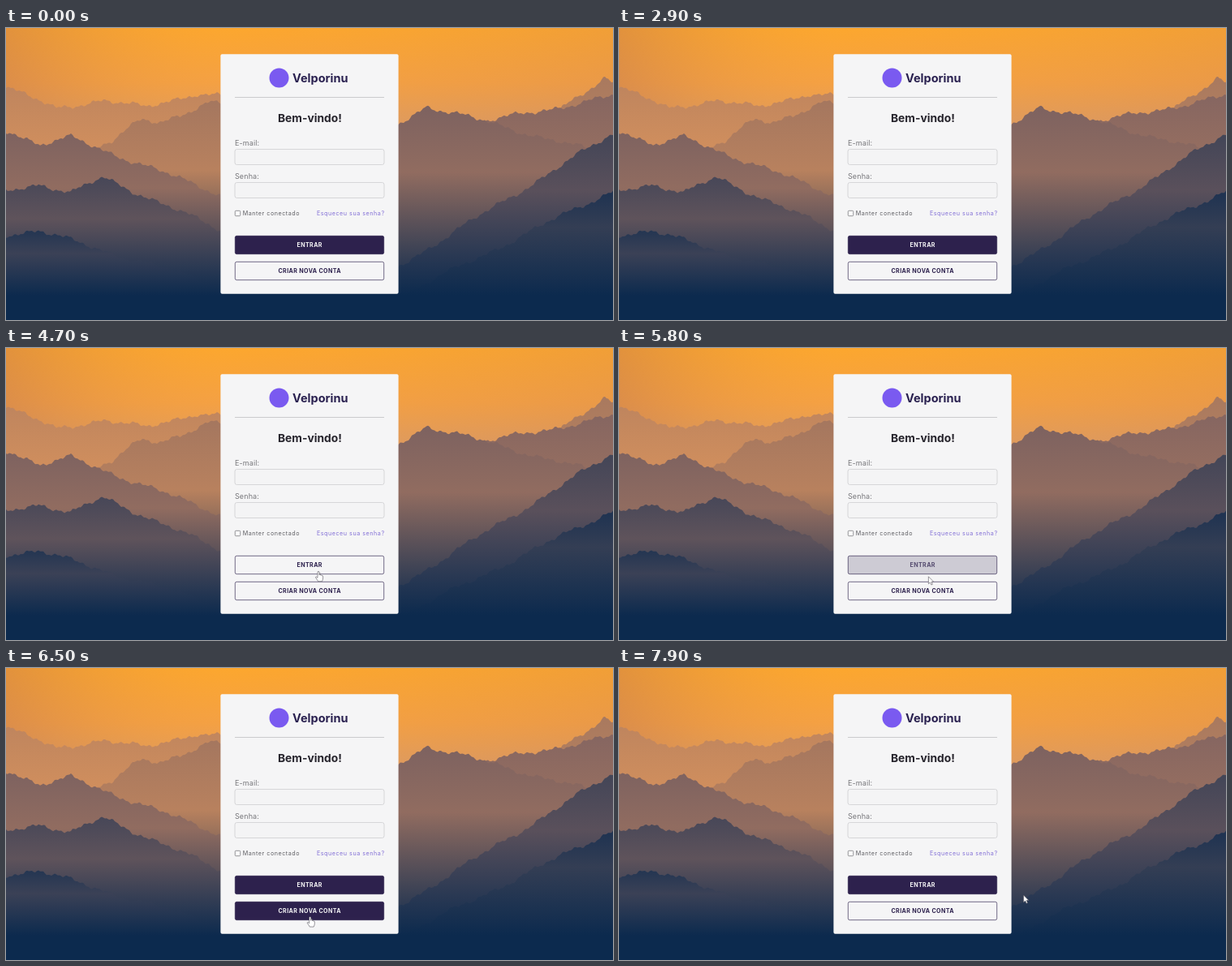
Write an HTML page that moves like this. It is 748 px wide and 360 px high and loops after 8000 ms.

```html
<!DOCTYPE html>
<html lang="pt-BR">
<head>
<meta charset="utf-8">
<title>Login</title>
<style>
  html, body { margin: 0; width: 100%; height: 100%; overflow: hidden; background: #0a294e; }
  svg { display: block; width: 748px; height: 360px; font-family: Inter, "Open Sans", sans-serif; }
  .field { fill: #f4f4f5; stroke: #cfcfd1; stroke-width: .8; }
  .label { font-size: 9px; letter-spacing: .1px; fill: #77777b; }
  .small { font-size: 7.2px; letter-spacing: .52px; fill: #606065; }
  .button text { font-size: 7.1px; letter-spacing: .38px; font-weight: 700; text-anchor: middle; }
  .button rect { stroke: #2d214d; stroke-width: .65; }
  .pointer path { fill: #fff; stroke: #55515c; stroke-width: .6; stroke-linejoin: round; }
</style>
</head>
<body>
<svg viewBox="0 0 748 360">
  <defs>
    <linearGradient id="sky" x2="0" y2="1">
      <stop offset="0" stop-color="#fca62e"/>
      <stop offset=".45" stop-color="#f39f45"/>
      <stop offset=".8" stop-color="#dc9a64"/>
    </linearGradient>
    <linearGradient id="dusk">
      <stop offset="0" stop-color="#bd7650" stop-opacity=".42"/>
      <stop offset=".36" stop-color="#ffae34" stop-opacity=".1"/>
      <stop offset="1" stop-color="#cf8850" stop-opacity=".25"/>
    </linearGradient>
  </defs>
  <rect width="748" height="150" fill="url(#sky)"/>
  <rect width="748" height="150" fill="url(#dusk)"/>
  <g id="hills"></g>

  <rect x="264.4" y="32.2" width="219.2" height="295.6" rx="2" fill="#f5f5f6"/>
  <circle cx="336.5" cy="61.5" r="12" fill="#7a5af0"/>
  <text x="353" y="67" font-size="14.5" font-weight="700" fill="#2a2150">Velporinu</text>
  <path d="M282 85.5H466" stroke="#cbcbcd"/>
  <text x="374.4" y="115.7" font-size="13.8" font-weight="700" text-anchor="middle" fill="#27252d">Bem-vindo!</text>

  <text class="label" x="282" y="145">E-mail:</text>
  <rect class="field" x="282" y="149.5" width="184" height="19" rx="2.5"/>
  <text class="label" x="282" y="186">Senha:</text>
  <rect class="field" x="282" y="190.5" width="184" height="19" rx="2.5"/>

  <rect x="282.3" y="225.3" width="6.4" height="6.4" rx="1" fill="#fff" stroke="#77777b" stroke-width=".8"/>
  <text class="small" x="291.7" y="231.2">Manter conectado</text>
  <text class="small" x="466.6" y="231.2" text-anchor="end" style="fill:#8370d6">Esqueceu sua senha?</text>

  <g class="button" id="enter">
    <rect x="282.3" y="256.3" width="183.4" height="22.4" rx="2"/>
    <text x="374.2" y="270">ENTRAR</text>
  </g>
  <g class="button" id="create">
    <rect x="282.3" y="288.3" width="183.4" height="22.4" rx="2"/>
    <text x="374.2" y="302">CRIAR NOVA CONTA</text>
  </g>

  <g class="pointer" id="pointer">
    <path id="arrow" d="M0 0V9L2.1 7.1 3.5 10.2 5 9.5 3.7 6.5H6.4Z"/>
    <path id="hand" d="M-1 .6Q0-.6 1 .6V4.6Q2-.1 2.6 4.8 3.8 4.2 4.2 5.4 5.6 5 5.6 6.4V8.6Q5.5 10.4 4.5 12.4H-.4Q-1.4 10.4-3.2 8.2-4 6.9-2.8 6.7L-1 8Z"/>
  </g>
</svg>
<script>
const $ = id => document.getElementById(id);
const LIGHT = [245, 245, 246], DARK = [45, 33, 77];
const HAZE = [226, 152, 92], BROWN = [130, 100, 97], NAVY = [12, 42, 78];
const LEFT = 0, RIGHT = 374;

const progress = (t, from, to) => Math.max(0, Math.min(1, (t - from) / (to - from)));
const ease = p => p * p * (3 - 2 * p);
const mix = (a, b, p) => a + (b - a) * p;
const blend = (a, b, p) => `rgb(${a.map((v, i) => Math.round(mix(v, b[i], p)))})`;

// Colour of the air at a depth: 0 is far and hazy, 1 is near and dark.
const air = depth => depth < .5 ? blend(HAZE, BROWN, depth * 2) : blend(BROWN, NAVY, depth * 2 - 1);

// Slopes fall away from each peak; every ridge fades into mist below its crest.
function ridge(side, depth, ...peaks) {
  const id = 'ridge' + $('hills').childElementCount;
  const rough = x => [.05, .13, .37, .9].reduce((sum, f, i) => sum + Math.sin(x * f + depth * 50) * (2 - i * .4), 0);
  const height = x => Math.min(...peaks.map(([px, py, fallLeft, fallRight]) =>
    py + (x < px ? (px - x) * fallLeft : (x - px) * fallRight)));
  let edge = '';
  for (let x = side; x <= side + 374; x += 2) edge += `L${x} ${(height(x) + rough(x)).toFixed(1)}`;
  const crest = Math.min(...peaks.map(p => p[1]));
  $('hills').insertAdjacentHTML('beforeend', `
    <linearGradient id="${id}" gradientUnits="userSpaceOnUse" x1="0" x2="0" y1="${crest}" y2="330">
      <stop stop-color="${air(depth)}"/>
      <stop offset=".35" stop-color="${air(depth - .1)}"/>
      <stop offset="1" stop-color="${air(1)}"/>
    </linearGradient>
    <path fill="url(#${id})" d="M${side} 360${edge}V360Z"/>`);
}

ridge(LEFT, .18, [0, 72, 0, .45], [120, 88, .2, .2], [235, 80, .3, .1]);
ridge(LEFT, .32, [167, 113, .75, .15], [250, 92, .4, .1]);
ridge(LEFT, .52, [5, 126, 0, .5], [80, 135, .25, .38]);
ridge(LEFT, .75, [40, 192, .2, .3], [120, 184, .5, .45]);
ridge(LEFT, .9, [40, 250, .1, .3]);
ridge(RIGHT, .3, [738, 60, .75, .6]);
ridge(RIGHT, .48, [748, 84, .2, 0]);
ridge(RIGHT, .52, [518, 96, .65, .27]);
ridge(RIGHT, .77, [748, 130, .62, 0]);
ridge(RIGHT, .93, [748, 200, .5, 0]);

// Pointer stops: time, x, y. The way out swings downwards.
const stops = [
  [3400, 488, 246], [4200, 408.5, 256.7], [4700, 385, 275.3], [5600, 385, 275.3],
  [6100, 374.7, 293.8], [6500, 374.7, 306.7], [7100, 374.7, 306.7], [7900, 498.5, 280]
];
const SWING = 33;

function tip(t) {
  const next = Math.max(1, stops.findIndex(s => t <= s[0]));
  const [t1, x1, y1] = stops[next - 1], [t2, x2, y2] = stops[next];
  const p = ease(progress(t, t1, t2));
  const swing = next === stops.length - 1 ? SWING * 4 * p * (1 - p) : 0;
  return [mix(x1, x2, p), mix(y1, y2, p) + swing];
}

function paintButton(id, filled) {
  const [box, label] = $(id).children;
  box.style.fill = blend(LIGHT, DARK, filled);
  label.style.fill = blend(DARK, LIGHT, filled);
}

function draw() {
  const t = Math.floor(performance.now() % 8000 / 100) * 100;
  const [x, y] = tip(t);
  const over = x > 282 && x < 466 && (y > 256 && y < 279 || y > 288 && y < 311);
  paintButton('enter', 1 - ease(progress(t, 4200, 4600)) + ease(progress(t, 5700, 6050)));
  paintButton('create', ease(progress(t, 5920, 6270)) - ease(progress(t, 7200, 7550)));
  $('pointer').style.display = t < 3400 ? 'none' : '';
  $('pointer').setAttribute('transform', `translate(${x} ${y})`);
  $('hand').style.display = over ? '' : 'none';
  $('arrow').style.display = over ? 'none' : '';
  requestAnimationFrame(draw);
}
draw();
</script>
</body>
</html>
```
